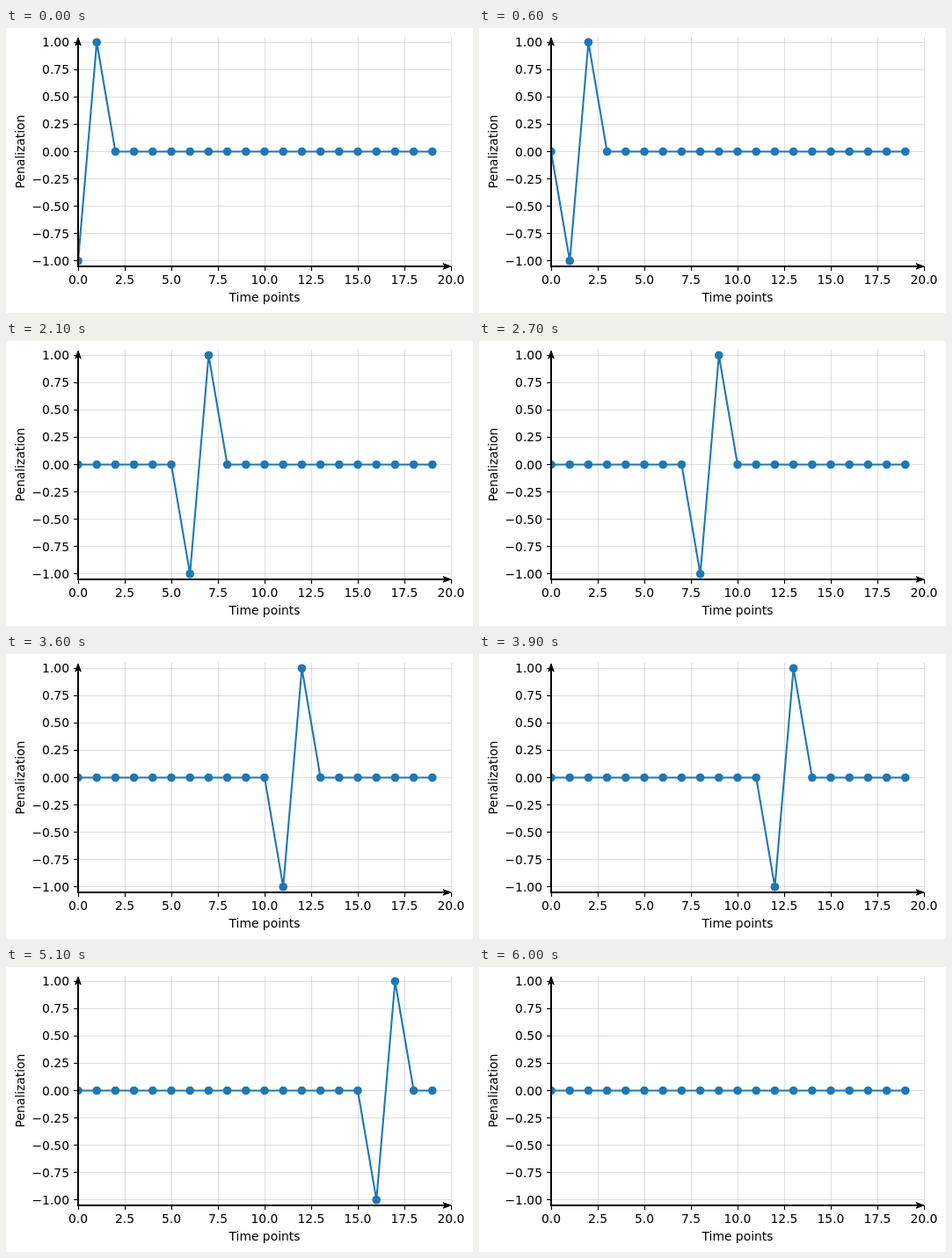
These frames come from a looping animation (531 px wide and 324 px high, 6.3 s). An HTML page:

```html
<!DOCTYPE html>
<html lang="en">
<head>
<meta charset="utf-8">
<title>Penalization over time</title>
<style>
  html, body { margin: 0; width: 100%; height: 100%; overflow: hidden; background: #fff; }
  svg { display: block; }
  text { font: 13.89px "DejaVu Sans", sans-serif; fill: #000; }
  .grid { stroke: #b0b0b0; stroke-opacity: .4; stroke-width: 1.1; }
  .tick { stroke: #000; stroke-width: 1.1; }
  .axis { stroke: #000; stroke-width: 2; }
  .head { stroke: #000; stroke-width: 1; }
  .line { fill: none; stroke: #1f77b4; stroke-width: 2.08; stroke-linejoin: round; stroke-linecap: square; }
  .dot { fill: #1f77b4; }
</style>
</head>
<body>
<svg id="chart" width="531" height="324" viewBox="0 0 531 324">
  <clipPath id="plot"><rect x="82" y="10" width="424" height="261"/></clipPath>
</svg>
<script>
const LEFT = 82, RIGHT = 506, TOP = 10, BOTTOM = 271;
const COUNT = 20, FIRST = 600, STEP = 300, LOOP = 6300;
const svg = document.getElementById('chart');

const px = x => LEFT + x * 21.2;
const py = y => 140.5 - y * 124.25;
const snap = v => Math.floor(v) + .5;

function add(tag, attrs, parent = svg) {
  const el = document.createElementNS('http://www.w3.org/2000/svg', tag);
  for (const name in attrs) el.setAttribute(name, attrs[name]);
  return parent.appendChild(el);
}
const rule = (cls, x1, y1, x2, y2) => add('line', { class: cls, x1, y1, x2, y2 });
const label = (str, x, y, anchor, attrs) =>
  add('text', { x, y, 'text-anchor': anchor, ...attrs }).textContent = str;

// Grid, ticks and tick labels
for (let i = 0; i <= 8; i++) {
  const xv = i * 2.5, yv = i / 4 - 1;
  const x = snap(px(xv)), y = snap(py(yv));
  rule('grid', x, TOP, x, BOTTOM);
  rule('grid', LEFT, y, RIGHT, y);
  rule('tick', x, BOTTOM, x, BOTTOM + 5);
  rule('tick', LEFT - 5, y, LEFT, y);
  label(xv.toFixed(1), px(xv), 291, 'middle');
  label(yv.toFixed(2).replace('-', '\u2212'), 72, Math.round(py(yv) + 5), 'end');
}
label('Time points', 294, 311, 'middle');
label('Penalization', 0, 0, 'middle', { transform: 'translate(21 140.5) rotate(-90)' });

// Data series
const series = add('g', { 'clip-path': 'url(#plot)' });
const line = add('polyline', { class: 'line' }, series);
const dots = Array.from({ length: COUNT }, (_, i) =>
  add('circle', { class: 'dot', cx: px(i), r: 4.8 }, series));

// Axes with notched arrowheads
rule('axis', LEFT, BOTTOM + 1, LEFT, TOP + 6);
rule('axis', LEFT - 1, BOTTOM, RIGHT - 6, BOTTOM);
const head = 'M0 0L-9 -3.2L-6.5 0L-9 3.2Z';
add('path', { class: 'head', d: head, transform: `translate(${RIGHT} ${BOTTOM})` });
add('path', { class: 'head', d: head, transform: `translate(${LEFT} ${TOP + 1}) rotate(-90)` });

// The pulse moves one point per step; the last step is flat
function value(i, step) {
  if (step === COUNT - 1) return 0;
  return i === step ? -1 : i === step + 1 ? 1 : 0;
}

let shown = -1;
function draw(now) {
  const t = now % LOOP;
  const step = t < FIRST ? 0 : 1 + Math.floor((t - FIRST) / STEP);
  if (step !== shown) {
    shown = step;
    const ys = dots.map((_, i) => py(value(i, step)));
    dots.forEach((dot, i) => dot.setAttribute('cy', ys[i]));
    line.setAttribute('points', ys.map((y, i) => px(i) + ',' + y).join(' '));
  }
}

const start = performance.now();
function tick() {
  draw(performance.now() - start);
  requestAnimationFrame(tick);
}
tick();
</script>
</body>
</html>
```
